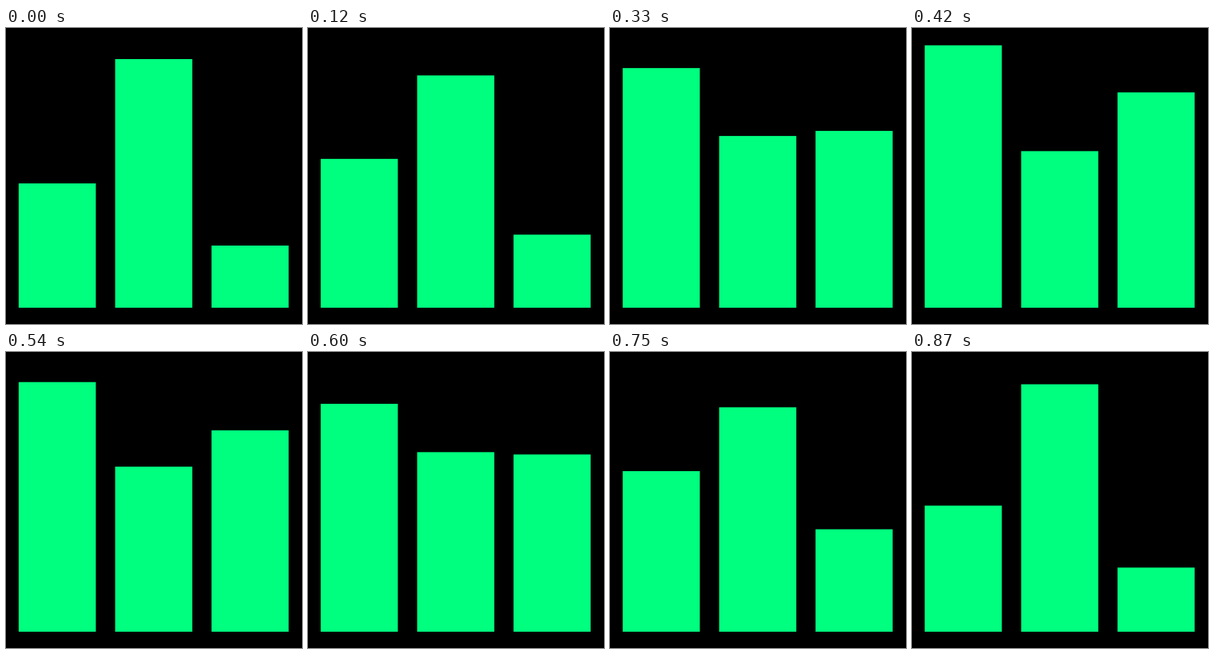
Write an HTML page with a canvas that moves like this. It is 400 px wide and 400 px high and loops after 900 ms.

```html
<!DOCTYPE html>
<html lang="en">
<head>
<meta charset="utf-8">
<title>Bars loader</title>
<style>
  html, body { margin: 0; width: 100%; height: 100%; overflow: hidden; background: #000; }
  canvas { display: block; filter: blur(.5px); }
</style>
</head>
<body>
<canvas id="stage" width="400" height="400"></canvas>
<script>
const ctx = document.getElementById('stage').getContext('2d');
const LOOP = 900, TICK = 30, BASE = 378;

// Cubic bezier easing with handles (x1, 0) and (x2, 1)
function bezier(x1, x2) {
  return x => {
    let lo = 0, hi = 1;
    for (let i = 0; i < 24; i++) {
      const s = (lo + hi) / 2, r = 1 - s;
      if (3 * r * r * s * x1 + 3 * r * s * s * x2 + s * s * s < x) lo = s;
      else hi = s;
    }
    return lo * lo * (3 - 2 * lo);
  };
}

const ease = bezier(1 / 3, 2 / 3);
const late = bezier(.64, 2 / 3);

const bars = [
  { x: 17.2, from: 210, to: 21, out: ease },
  { x: 147.5, from: 42, to: 168, out: ease },
  { x: 277.7, from: 294, to: 84, out: late }
];

function draw(ms) {
  const t = Math.floor(ms / TICK) * TICK % LOOP / (LOOP / 2);
  ctx.fillStyle = '#000';
  ctx.fillRect(0, 0, 400, 400);
  ctx.fillStyle = '#00ff7f';
  for (const { x, from, to, out } of bars) {
    const p = t < 1 ? out(t) : 1 - ease(t - 1);
    const top = from + (to - from) * p;
    ctx.fillRect(x, top, 104.2, BASE - top);
  }
}

const start = performance.now();
function frame() {
  // Small lead keeps ticks from slipping through clock rounding
  draw(performance.now() - start + 2);
  requestAnimationFrame(frame);
}
frame();
</script>
</body>
</html>
```
